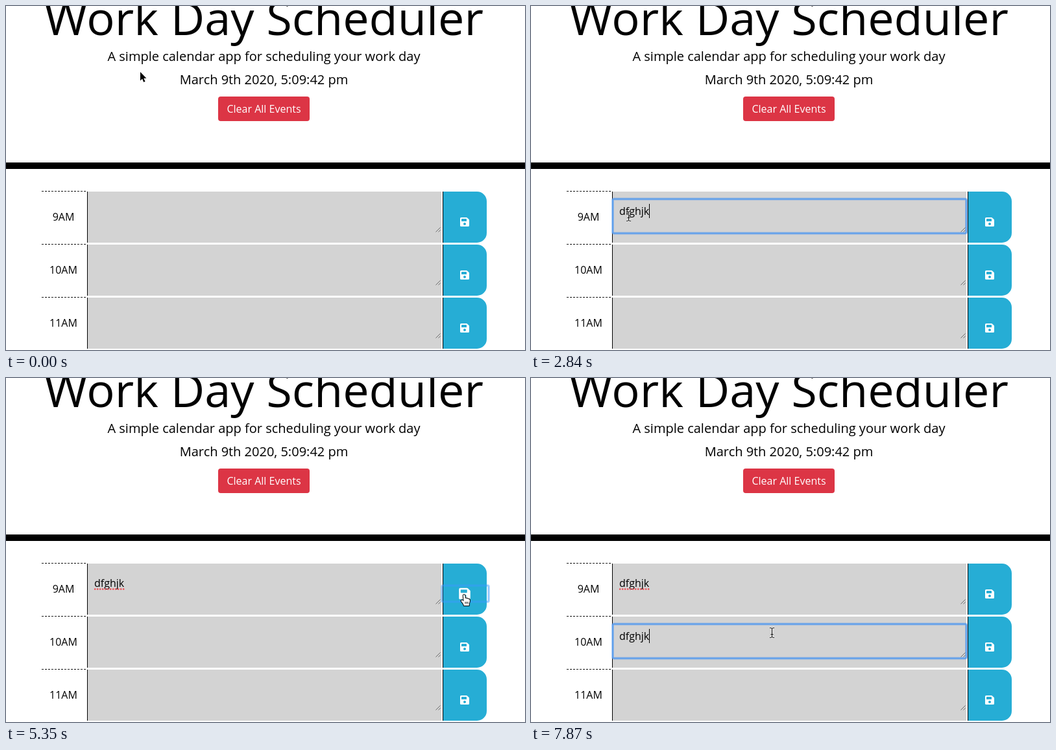
An HTML page with a canvas for the animation above (8000 ms loop, 800 by 532 pixels).

```html
<!DOCTYPE html>
<html lang="en">
<head>
<meta charset="utf-8">
<title>Work Day Scheduler</title>
<style>
  html, body { margin: 0; width: 100%; height: 100%; overflow: hidden; background: #fff; }
  canvas { display: block; }
</style>
</head>
<body>
<canvas id="stage" width="800" height="532"></canvas>
<script>
const ctx = document.getElementById('stage').getContext('2d');
const LOOP = 8000, ROW_TOP = 287, ROW_STEP = 82;
const BLUE = '#26add5', GRAY = '#d3d3d3', WORD = 'dfghjk';
const HOURS = ['9AM', '10AM', '11AM'];

// Pointer moves: start, time of last step, number of steps, ease power, Bezier points
const MOVES = [
  { from: 150, to: 740, n: 5, pow: 1, p: [[207, 102], [559, 130], [559, 330], [150, 325]] },
  { from: 3430, to: 4310, n: 7, pow: 2, p: [[150, 325], [300, 262], [664, 349], [705, 337]] },
  { from: 4450, to: 4900, n: 4, pow: 1, p: [[705, 337], [734, 348], [734, 348], [706, 335]] },
  { from: 5950, to: 6380, n: 4, pow: 1, p: [[706, 335], [620, 350], [450, 394], [371, 394]] }
];

// Steps of [time, value]; the last one reached holds
const FOCUS = [[0, ''], [1040, 'text0'], [5350, 'save0'], [6680, 'text1']];
const CARET = [[0, 1], [1490, 0], [1940, 1], [2390, 0], [2540, 1], [3290, 0], [3870, 1],
  [4450, 0], [4900, 1], [6680, 1], [7130, 0], [7430, 1]];
const TYPED = [
  [[0, 0], [2540, 2], [2690, 4], [2840, 6]],
  [[0, 0], [7430, 1], [7580, 3], [7730, 5], [7870, 6]],
  [[0, 0]]
];
const ICON = [[0, 16], [4750, 18], [4900, 20], [5950, 18], [6090, 16]];

function at(steps, t) {
  let value = steps[0][1];
  for (const [time, v] of steps) if (t >= time) value = v;
  return value;
}

function bezier(p, s) {
  const r = 1 - s, w = [r * r * r, 3 * r * r * s, 3 * r * s * s, s * s * s];
  return [0, 1].map(i => w.reduce((sum, k, j) => sum + k * p[j][i], 0));
}

function pointerAt(t) {
  let pos = MOVES[0].p[0];
  for (const { from, to, n, pow, p } of MOVES) {
    if (t < from) break;
    const gap = (to - from) / (n - 1);
    const step = Math.min(n, Math.floor((t - from + 1) / gap) + 1);
    pos = bezier(p, 1 - Math.pow(1 - step / n, pow));
  }
  return pos.map(Math.round);
}

function box(x, y, w, h, color) {
  ctx.fillStyle = color;
  ctx.fillRect(x, y, w, h);
}

function round(x, y, w, h, radius) {
  ctx.beginPath();
  ctx.roundRect(x, y, w, h, radius);
}

function text(str, x, y, size, align = 'center', color = '#000') {
  ctx.font = `${size}px "Open Sans", sans-serif`;
  ctx.textAlign = align;
  ctx.fillStyle = color;
  ctx.fillText(str, x, y);
}

function line(points, color, width) {
  ctx.beginPath();
  points.forEach(([x, y]) => ctx.lineTo(x, y));
  ctx.strokeStyle = color;
  ctx.lineWidth = width;
  ctx.stroke();
}

function ring(x, y, w, h, layers) {
  for (const [width, color] of layers) {
    round(x, y, w, h, 2);
    ctx.strokeStyle = color;
    ctx.lineWidth = width;
    ctx.stroke();
  }
}

function saveIcon(cx, cy, size) {
  ctx.save();
  ctx.translate(cx, cy);
  ctx.scale(size / 512, size / 512);
  ctx.translate(-224, -256);
  ctx.fillStyle = '#fff';
  ctx.fill(new Path2D('M434 130L350 46A48 48 0 0 0 316 32H48A48 48 0 0 0 0 80V432A48 48 0 0 0 48 480H400A48 48 0 0 0 448 432V164A48 48 0 0 0 434 130Z'));
  ctx.fillStyle = BLUE;
  round(64, 96, 256, 128, 12);
  ctx.fill();
  ctx.beginPath();
  ctx.arc(224, 352, 64, 0, 7);
  ctx.fill();
  ctx.restore();
}

function header() {
  const mid = 397.5;
  text('Work Day Scheduler', mid, 45, 72);
  text('A simple calendar app for scheduling your work day', mid, 85, 20);
  text('March 9th 2020, 5:09:42 pm', mid, 121, 20);
  round(327, 140, 141, 38, 4);
  ctx.fillStyle = '#dc3545';
  ctx.fill();
  text('Clear All Events', mid, 165, 16, 'center', '#fff');
  box(0, 242, 800, 10, '#000');
}

function row(i, t) {
  const y = ROW_TOP + i * ROW_STEP, focus = at(FOCUS, t);
  for (let x = 55; x < 124; x += 5) box(x, y - 1, 3, 1, '#000');
  text(HOURS[i], 88.5, y + 45, 16);

  box(126, y, 545, 79, GRAY);
  box(125, y, 1, 79, '#000');
  line([[662.5, y + 62.5], [669.5, y + 55.5]], '#6b6b6b', 1);
  line([[666.5, y + 62.5], [669.5, y + 59.5]], '#6b6b6b', 1);

  box(673, y, 1, 79, '#000');
  round(674, y, 67, 79, [0, 15, 15, 0]);
  ctx.fillStyle = BLUE;
  ctx.fill();

  const size = i ? 16 : at(ICON, t);
  if (focus === 'save' + i) {
    const grow = size > 16 ? 1 : 0;
    ring(672, y + 35 - grow, 72, 23 + 2 * grow, [[4, 'rgba(59,153,252,.32)'], [2, 'rgba(59,153,252,.3)']]);
  }
  saveIcon(707, y + 47 - (size - 16) / 8, size);

  const active = focus === 'text' + i;
  if (active) ring(126, y + 11.5, 545, 53, [[4, 'rgba(94,158,237,.5)'], [2, '#5f9fec']]);

  const typed = WORD.slice(0, at(TYPED[i], t));
  text(typed, 136, y + 36, 16, 'left');
  if (i === 0 && t >= 3290) {
    ctx.fillStyle = '#ef4a4f';
    for (let x = 137.2; x < 182; x += 4) {
      ctx.beginPath();
      ctx.arc(x, y + 39.5, 1.3, 0, 7);
      ctx.fill();
    }
  }
  if (active && at(CARET, t)) {
    box(Math.floor(136 + ctx.measureText(typed).width), y + 19, 1, 22, '#000');
  }
}

function shape(path, fill, edge, width) {
  const p = new Path2D(path);
  ctx.lineJoin = 'round';
  ctx.lineWidth = width;
  ctx.strokeStyle = edge;
  ctx.stroke(p);
  ctx.fillStyle = fill;
  ctx.fill(p);
}

const CURSORS = {
  arrow() {
    shape('M0 0V13.4L3 10.6L5.2 15.8L7.5 14.8L5.3 9.8H9.4Z', '#000', '#fff', 1.8);
  },
  beam() {
    const p = new Path2D('M-3 -7.5H-1.5Q0.5 -7.5 .5 -5.5V5.5Q.5 7.5 -1.5 7.5H-3M4 -7.5H2.5Q.5 -7.5 .5 -5.5M4 7.5H2.5Q.5 7.5 .5 5.5M-1.5 2.5H2.5');
    ctx.lineWidth = 2.4;
    ctx.strokeStyle = 'rgba(255,255,255,.45)';
    ctx.stroke(p);
    ctx.lineWidth = 1;
    ctx.strokeStyle = '#111';
    ctx.stroke(p);
  },
  hand() {
    shape('M-1.3 1.5Q-1.2 .2 0 .2Q1.2 .2 1.5 1.5L2.2 6Q3.6 4.9 4.6 6.4Q6 5.5 6.8 7Q8.6 6.5 8.9 8.4Q9.3 11.2 7.7 14V17H-.2Q-.4 14.8 -2 13L-4.3 10.2Q-4.8 8.6 -3.2 8.5Q-1.8 8.8 -.4 10.4Z', '#fff', '#000', 2);
    ctx.lineWidth = .8;
    for (const x of [2, 4, 6]) line([[x, 11], [x, 14.2]], '#000', .8);
  }
};

function cursor(t) {
  const [x, y] = pointerAt(t);
  const inRow = (y - ROW_TOP) % ROW_STEP;
  const inList = y >= ROW_TOP;
  let kind = 'arrow';
  if (inList && x > 125 && x < 671 && inRow > 10 && inRow < 65) kind = 'beam';
  if (inList && x > 673 && x < 741) kind = 'hand';
  if (x > 327 && x < 468 && y > 140 && y < 178) kind = 'hand';
  ctx.save();
  ctx.translate(x, y);
  CURSORS[kind]();
  ctx.restore();
}

function draw(now) {
  const t = now % LOOP;
  box(0, 0, 800, 532, '#fff');
  header();
  HOURS.forEach((_, i) => row(i, t));
  cursor(t);
}

let start;
function frame(now) {
  start ??= now;
  draw(now - start);
  requestAnimationFrame(frame);
}
draw(0);
requestAnimationFrame(frame);
</script>
</body>
</html>
```
